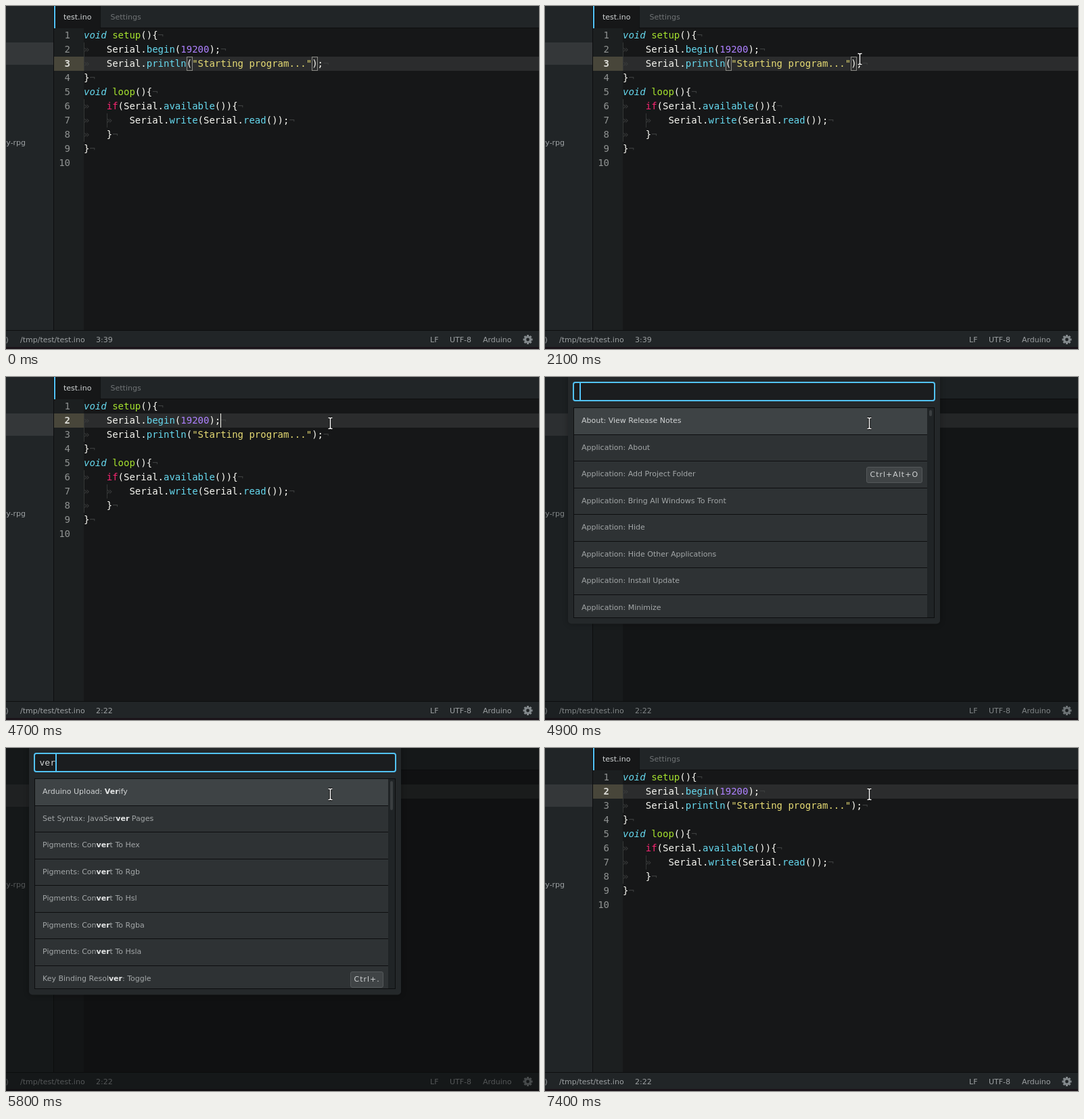
An HTML page with a canvas for the animation above (8 s loop, 788 by 508 pixels).

```html
<!DOCTYPE html>
<html lang="en">
<head>
<meta charset="utf-8">
<title>Editor</title>
<style>
html, body { margin: 0; width: 100%; height: 100%; overflow: hidden; background: #161718; }
canvas { display: block; }
</style>
</head>
<body>
<canvas id="stage" width="788" height="508"></canvas>
<script>
const ctx = document.getElementById('stage').getContext('2d');
const W = 788, H = 508, LOOP = 8000, STEP = 100;
const CODE_X = 115, ROW = 21, CH = 8.428, ITEM = 39.5;
const UI = '11px "DejaVu Sans", sans-serif';
const MONO = '14px "DejaVu Sans Mono", monospace';
const INPUT = '13px "DejaVu Sans Mono", monospace';
const INK = { w: '#f8f8f2', i: '#66d9ef', b: '#66d9ef', g: '#a6e22e', n: '#ae81ff', s: '#e6db74', k: '#f92672' };

// Each line: tab count, then style:text parts.
const CODE = [
  [0, 'i:void |g:setup|w:(){'],
  [1, 'w:Serial.|b:begin|w:(|n:19200|w:);'],
  [1, 'w:Serial.|b:println|w:(|s:"Starting program..."|w:);'],
  [0, 'w:}'],
  [0, 'i:void |g:loop|w:(){'],
  [1, 'k:if|w:(Serial.|b:available|w:()){'],
  [2, 'w:Serial.|b:write|w:(Serial.|b:read|w:());'],
  [1, 'w:}'],
  [0, 'w:}']
];

// Brackets mark the matched letters; a tab starts the key hint.
const ALL = [
  'About: View Release Notes', 'Application: About', 'Application: Add Project Folder\tCtrl+Alt+O',
  'Application: Bring All Windows To Front', 'Application: Hide', 'Application: Hide Other Applications',
  'Application: Install Update', 'Application: Minimize'
];
const HIT_V = [
  'Arduino Upload: [V]erify', 'About: [V]iew Release Notes', 'Set Syntax: Ja[v]aServer Pages',
  'Pigments: Con[v]ert To Hex', 'Pigments: Con[v]ert To Rgb', 'Pigments: Con[v]ert To Hsl',
  'Pigments: Con[v]ert To Rgba', 'Pigments: Con[v]ert To Hsla'
];
const HIT_VER = [
  'Arduino Upload: [Ver]ify', 'Set Syntax: JavaSer[ver] Pages', 'Pigments: Con[ver]t To Hex',
  'Pigments: Con[ver]t To Rgb', 'Pigments: Con[ver]t To Hsl', 'Pigments: Con[ver]t To Rgba',
  'Pigments: Con[ver]t To Hsla', 'Key Binding Resol[ver]: Toggle\tCtrl+.'
];
const HIT_VE = HIT_VER.map(s => s.replace(/\[(ve)r\]/i, '[$1]r'));
const HIT_VERIF = [
  'Arduino Upload: [Verif]y', 'Git Diff: Mo[ve] To P[r]evious D[if]f\tAlt+G Up',
  'Tree View: Re[ve]al Act[i]ve [F]ile\tCtrl+Shift+\\'
];
const HIT_VERI = [
  'Arduino Upload: [Veri]fy', 'Git Diff: Mo[ve] To P[r]ev[i]ous Diff\tAlt+G Up',
  'Tree View: Re[ve]al Act[i]ve File\tCtrl+Shift+\\'
];
// Start time, typed text, list, thumb height.
const TYPING = [
  [4900, '', ALL, 9], [5500, 'v', ALL, 9], [5600, 'v', HIT_V, 16], [5700, 've', HIT_VE, 32],
  [5800, 'ver', HIT_VER, 43], [5900, 'veri', HIT_VER, 43], [6000, 'veri', HIT_VERI, 0],
  [6100, 'verif', HIT_VERI, 0], [6200, 'verif', HIT_VERIF, 0]
];
// Pointer stops: time, x, y.
const PATH = [
  [400, 781, 500], [1200, 662, 326], [1800, 475, 34], [1900, 475, 34], [2100, 466, 79],
  [2900, 466, 79], [3200, 480, 69], [LOOP, 480, 69]
];

function rect(x, y, w, h, color) {
  ctx.fillStyle = color;
  ctx.fillRect(x, y, w, h);
}

function text(s, x, y, color, font = UI) {
  ctx.font = font;
  ctx.fillStyle = color;
  ctx.fillText(s, x, y);
  return ctx.measureText(s).width;
}

function roundBox(x, y, w, h, r, fill, stroke, line = 1) {
  ctx.beginPath();
  ctx.roundRect(x, y, w, h, r);
  if (fill) { ctx.fillStyle = fill; ctx.fill(); }
  if (stroke) { ctx.strokeStyle = stroke; ctx.lineWidth = line; ctx.stroke(); }
}

function gear(x, y) {
  ctx.save();
  ctx.translate(x, y);
  ctx.fillStyle = ctx.strokeStyle = '#83898c';
  for (let i = 0; i < 8; i++) {
    ctx.fillRect(-1.5, -7, 3, 3);
    ctx.rotate(Math.PI / 4);
  }
  ctx.lineWidth = 3;
  ctx.beginPath();
  ctx.arc(0, 0, 3.9, 0, 7);
  ctx.stroke();
  ctx.restore();
}

function chrome(position) {
  rect(0, 0, W, H, '#161718');
  rect(0, 0, W, 32, '#212527');
  rect(0, 32, W, 1, '#0d0e0f');
  rect(0, 0, 70, 480, '#212527');
  rect(0, 54, 70, 33, '#343739');
  rect(70, 0, 1, 480, '#0d0e0f');
  rect(71, 0, 68, 33, '#161718');
  rect(139, 0, 1, 32, '#111314');
  rect(71, 0, 2, 33, '#52c3f7');
  text('test.ino', 85, 20, '#d0d3d4');
  text('Settings', 154.5, 20, '#707476');
  text('ty-rpg', -4, 206, '#9da1a3');
  rect(0, 480, W, 1, '#0d0e0f');
  rect(0, 481, W, 24, '#212527');
  rect(0, 505, W, 3, '#1b141a');
  const status = [[')', -0.5], ['/tmp/test/test.ino', 21], [position, 133], ['LF', 627], ['UTF-8', 656], ['Arduino', 705]];
  for (const [s, x] of status) text(s, x, 498, '#9da1a3');
  gear(771.5, 494);
}

function editor(line, caretX, brackets) {
  rect(71, 33, 44, 447, '#1c1f20');
  const top = 33 + (line - 1) * ROW;
  rect(71, top, 44, ROW, '#48463a');
  rect(CODE_X, top, W - CODE_X, ROW, '#2b2c2d');

  for (let n = 1; n <= 10; n++) {
    const on = n === line, y = 27 + n * ROW;
    ctx.textAlign = 'right';
    text(n, 95, y, on ? '#dcdcd6' : '#909392', (on ? 'bold ' : '') + MONO);
    ctx.textAlign = 'left';
    if (n > CODE.length) continue;
    const [tabs, parts] = CODE[n - 1];
    let x = CODE_X;
    for (let i = 0; i < tabs; i++, x += 4 * CH) {
      rect(Math.round(x), y - 15, 1, ROW, '#343636');
      text('»', x, y, '#3b3d3d', MONO);
    }
    for (const part of parts.split('|')) {
      const style = part[0];
      x += text(part.slice(2), x, y, INK[style], (style === 'i' ? 'italic ' : '') + MONO);
    }
    text('¬', x, y, '#3b3d3d', MONO);
  }
  if (brackets) {
    ctx.strokeStyle = '#8b8b86';
    ctx.lineWidth = 1;
    for (const x of [267.5, 452.5]) ctx.strokeRect(x, 75.5, 8, 20);
  }
  if (caretX) rect(caretX, top, 1, ROW, '#f8f8f0');
}

function keyHint(s, right, y) {
  ctx.letterSpacing = '1px';
  ctx.font = UI;
  const w = Math.round(ctx.measureText(s).width) + 11;
  roundBox(right - w + 0.5, y + 0.5, w - 1, 23, 2.5, '#404446', '#54585a');
  text(s, right - w + 5.5, y + 15, '#d0d3d4');
  ctx.letterSpacing = '0px';
}

function palette(typed, items, thumb) {
  const end = thumb ? 357 : 165, right = thumb ? 565 : 575;
  ctx.save();
  ctx.shadowColor = 'rgba(0,0,0,.3)';
  ctx.shadowBlur = 9;
  roundBox(34, -10, 550, end + 18.5, 5, '#24282a');
  ctx.restore();
  roundBox(42, 8, 534, 27, 3, '#1b1d1f', '#52c3f7', 2);
  text(typed, 49.5, 26, '#d0d3d4', INPUT);
  rect(Math.round(50.5 + typed.length * 7.826) - (typed ? 1 : 0), 9, 2, 25, '#52c3f7');

  ctx.save();
  ctx.beginPath();
  ctx.rect(42, 45, 534, end - 45);
  ctx.clip();
  rect(42, 45, 534, end - 45, '#0d0e0f');
  rect(43, 46, 532, end - 47, '#202426');
  const divider = i => Math.round(45.4 + i * ITEM);
  items.forEach((item, i) => {
    const top = divider(i) + 1, bottom = divider(i + 1);
    const [label, keys] = item.split('\t');
    rect(43, top, right - 43, bottom - top, i ? '#2e3234' : '#3e4345');
    rect(43, bottom, right - 43, 1, '#0d0e0f');
    let x = 54;
    label.split(/[\[\]]/).forEach((s, k) => {
      const color = k % 2 ? '#e4e6e6' : i ? '#a3a7a8' : '#d0d3d4';
      x += text(s, x, Math.round(68 + i * ITEM), color, (k % 2 ? 'bold ' : '') + UI);
    });
    if (keys) keyHint(keys, right - 7, Math.round(54 + i * ITEM));
  });
  if (thumb) roundBox(568, 49, 4, thumb, 2, '#3a3e40');
  rect(42, end - 1, 534, 1, '#0d0e0f');
  ctx.restore();
}

function pointerAt(t) {
  const i = PATH.findIndex(p => p[0] > t);
  const [t0, x0, y0] = PATH[i - 1], [t1, x1, y1] = PATH[i];
  const k = (t - t0) / (t1 - t0), e = k * k * (3 - 2 * k);
  return [x0 + (x1 - x0) * e, y0 + (y1 - y0) * e];
}

function pointer(t) {
  if (t < PATH[0][0]) return;
  const [x, y] = pointerAt(t).map(Math.round);
  const arrow = y > 480;
  ctx.save();
  ctx.translate(x - 0.5, y - 0.5);
  ctx.lineJoin = 'round';
  const shape = new Path2D(arrow
    ? 'M0 0V14L3.5 11L6 16L8 15L5.8 10H10Z'
    : 'M-3 -8H-1L0 -7L1 -8H3M0 -7V7M-3 8H-1L0 7L1 8H3');
  ctx.strokeStyle = '#000';
  ctx.lineWidth = 3.4;
  ctx.stroke(shape);
  ctx.strokeStyle = ctx.fillStyle = '#fff';
  ctx.lineWidth = 1.5;
  if (arrow) ctx.fill(shape);
  else ctx.stroke(shape);
  ctx.restore();
}

function draw(time) {
  const t = Math.floor(time % LOOP / STEP) * STEP;
  const clicked = t >= 2400, moved = t >= 3300, open = t >= 4900 && t < 6800;
  const caretOn = clicked && !(t >= 4100 && t < 4700) && !open && t < 7400;
  chrome(moved ? '2:22' : clicked ? '3:40' : '3:39');
  editor(moved ? 2 : 3, caretOn && (moved ? 317 : 469), !clicked);
  if (open) {
    const dim = 0.18 + 0.32 * Math.min(1, (t - 4900) / 400);
    rect(0, 0, W, H, `rgba(10,12,13,${dim})`);
    const [, typed, items, thumb] = TYPING.findLast(s => s[0] <= t);
    palette(typed, items, thumb);
  }
  pointer(t);
}

const start = performance.now();
function tick() {
  draw(performance.now() - start);
  requestAnimationFrame(tick);
}
tick();
</script>
</body>
</html>
```
